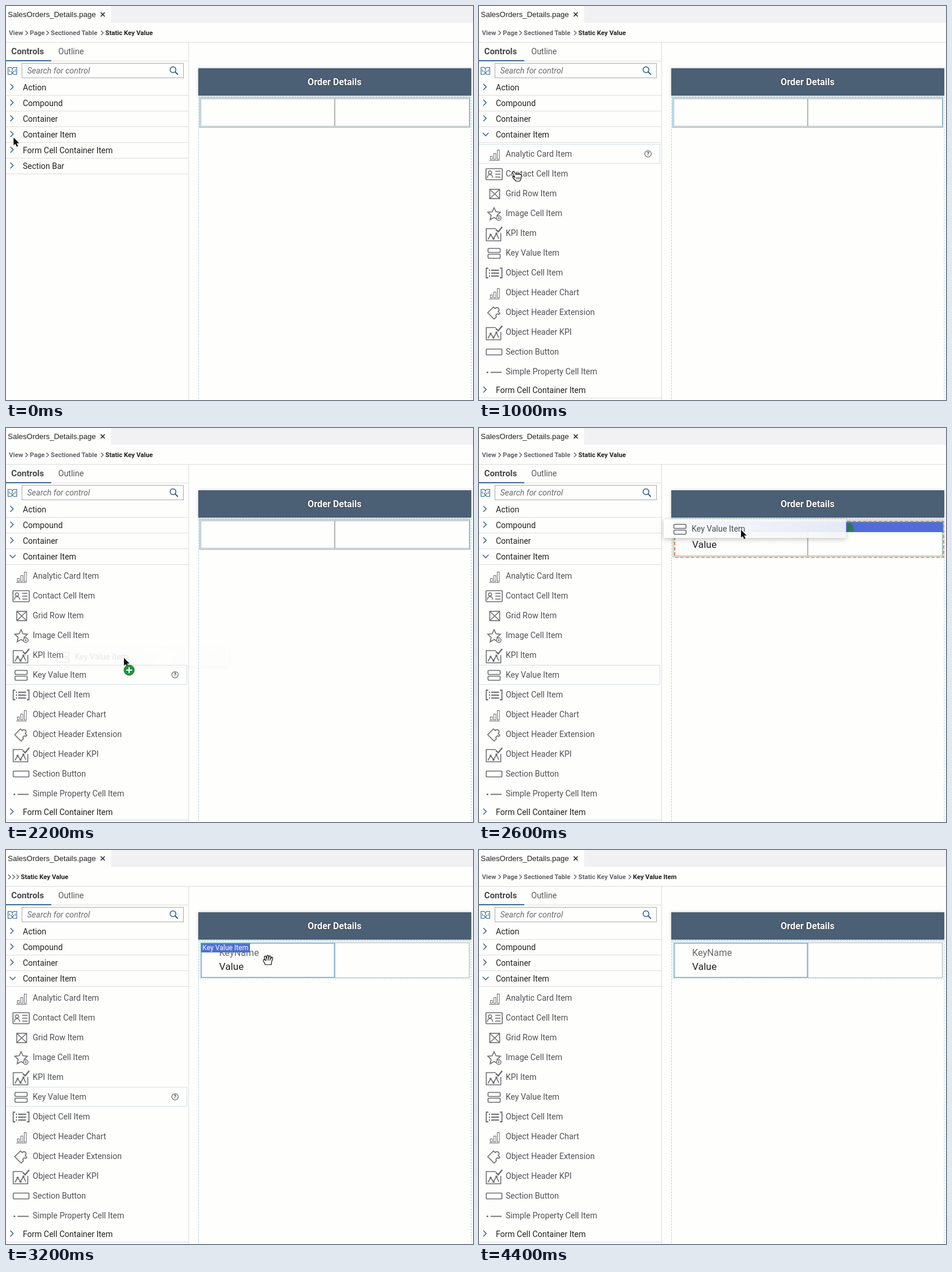
Write an HTML page that moves like this. It is 804 by 677 pixels and loops after 4600 ms.

```html
<!DOCTYPE html>
<html lang="en">
<head>
<meta charset="utf-8">
<style>
  html, body { margin: 0; width: 100%; height: 100%; overflow: hidden; background: #fefefd; }
  svg { display: block; font: 14px Roboto, Arial, sans-serif; fill: none; }
  text { white-space: pre; }
</style>
</head>
<body>
<svg id="stage" width="804" height="677" viewBox="0 0 804 677"></svg>
<script>
const text = (x, y, s, fill = '#222', extra = '') => `<text x="${x}" y="${y}" fill="${fill}" ${extra}>${s}</text>`;
const path = (d, stroke, width = 1, extra = '') => `<path d="${d}" stroke="${stroke}" stroke-width="${width}" ${extra}/>`;
const box = (x, y, w, h, stroke, width = 1, extra = '') =>
  `<rect x="${x}" y="${y}" width="${w}" height="${h}" stroke="${stroke}" stroke-width="${width}" ${extra}/>`;
const fillBox = (x, y, w, h, fill, extra = '') => `<rect x="${x}" y="${y}" width="${w}" height="${h}" fill="${fill}" ${extra}/>`;
const group = (id, body) => `<g id="${id}">${body}</g>`;
const place = (x, y, body) => `<g transform="translate(${x} ${y})">${body}</g>`;

// Icons are drawn around the middle of a list row
const grey = '#6b6d70';
const bars = box(-6.5, 4.5, 3.5, 5, grey) + box(-.5, -.5, 3.5, 10, grey) + box(5.5, -6.5, 3.5, 16, grey) + path('M-8.5 11.5H9.5', grey);
const kpi = path('M3-7.5H-13.5V13.5H11.5V0', grey, 1.6) + path('M-10.5 11L-6 3-1 10 4 1 8 10', grey, 1.6) +
  path('M3-6L7-2 14-10.5', grey, 2.4) +
  [[-6, 3], [-1, 10], [4, 1]].map(([x, y]) => `<circle cx="${x}" cy="${y}" r="1.8" fill="${grey}"/>`).join('');
const star = Array.from({ length: 10 }, (_, i) => {
  const r = i % 2 ? 5.4 : 11.5, a = (i / 5 - .5) * Math.PI;
  return `${(r * Math.cos(a)).toFixed(1)} ${(r * Math.sin(a) + 2).toFixed(1)}`;
}).join('L');
const pair = box(-10.5, -7.5, 21, 7, grey, 1.6, 'rx="1.5"') + box(-10.5, 2.5, 21, 7, grey, 1.6, 'rx="1.5"');
const items = [
  ['Analytic Card Item', bars],
  ['Contact Cell Item', box(-14, -8.5, 28, 19, grey, 1.6, 'rx="1"') +
    `<circle cx="-7" cy="-2" r="2.8" stroke="${grey}" stroke-width="1.4"/>` +
    path('M-11.5 7c0-7 9-7 9 0M2-4H11M2 1H11M2 6H11', grey, 1.6)],
  ['Grid Row Item', box(-7.5, -7, 17, 16, grey, 1.6) + path('M-7.5-7L9.5 9M9.5-7L-7.5 9', grey, 1.5)],
  ['Image Cell Item', path(`M${star}Z`, grey, 1.6) +
    `<circle cx="8" cy="8.5" r="4" fill="#fefefd" stroke="${grey}" stroke-width="1.4"/>` + path('M6 8.5H10M8 6.5V10.5', grey, 1.2)],
  ['KPI Item', kpi],
  ['Key Value Item', pair],
  ['Object Cell Item', path('M-10-7.5H-13.5V9H-10M10-7.5H13.5V9H10M-5-4H8.5M-5 1H8.5M-5 6H8.5', grey, 1.8) +
    path('M-9-4H-7M-9 1H-7M-9 6H-7', grey, 2)],
  ['Object Header Chart', bars],
  ['Object Header Extension', path('M-11 1L-1-9 2-6a3.6 3.6 0 1 1 5 5L10 2 8 4a2.6 2.6 0 1 0-4 4L0 12Z', grey, 1.7, 'stroke-linejoin="round"')],
  ['Object Header KPI', kpi],
  ['Section Button', box(-13.5, -4.5, 27, 10, grey, 1.6, 'rx="1"')],
  ['Simple Property Cell Item', path('M-6 1.5H13', grey, 1.8) + `<circle cx="-11.5" cy="1.5" r="1.6" fill="${grey}"/>`],
];
const rowY = i => 254 + 34 * i;
const row = ([name, icon]) => place(26, 0, icon) + text(46, 5, name, '#4f5154');

const section = (name, y, open) =>
  path(open ? `M6.5 ${y - 3}l5 5 5-5` : `M7.5 ${y - 6}l5 5-5 5`, '#2c5d86', 1.4) +
  text(29, y + 5, name) + path(`M0 ${y + 13.5}H314`, '#dcdddd');

// Breadcrumb: pairs of x and label, the last one darker
const crumb = x => path(`M${x} 42.5l4 3.8-4 3.8`, '#555', 1.2);
const bold = 'font-size="11.2" font-weight="700"';
const crumbs = list => list.map(([x, s], i) =>
  (i ? crumb(x - 7.5) : '') + text(x, 50, s, i === list.length - 1 ? '#222' : '#626467', bold)).join('');
const trail = [[5, 'View'], [41, 'Page'], [77, 'Sectioned Table'], [171, 'Static Key Value']];

const dashed = (x, y, w, h, color, dash = '3 2') => box(x, y, w, h, color, 1, `stroke-dasharray="${dash}"`);
const cells = h => box(335.5, 159.5, 462, h, '#b3b5b6') + path(`M566 159.5v${h}`, '#a3a5a6', 1.6);

const outline = 'fill="#fff" stroke-linejoin="round"';
const palm = path('M-6 8C-6 5-10 2-9 0-8-2-6 0-5 1L-7-4C-8-7-5-8-4-5L-3-2V-6C-3-9 0-9 0-6V-2L1-6C2-8 4-7 4-5L3-1 5-4C6-6 8-4 7-2L5 4V8Z',
  '#111', 1.2, outline) + path('M-3-2V1M0-2V1M3-1L2.500 1', '#111');
const finger = path('M1 1C3-1 4 1 5 3L7 6C7 3 10 4 10 6 11 3 13 4 13 6 15 4 16 6 16 8L15 14 13 17H7L2 12C0 9 2 8 5 11L1 3Z',
  '#111', 1.2, outline) + path('M8 10V14M10.5 10V14M13 10V14', '#111', .9);
const arrow = path('M0 0V13.5L3 10.8 5.4 15.8 7.8 14.7 5.5 9.8H9.8Z', '#fff', 1.2, 'fill="#111" paint-order="stroke"');
const badge = '<circle cx="9" cy="21" r="9" fill="#23933c" stroke="#287a3b"/>' + path('M9 16v10M4 21h10', '#fff', 2.2);

stage.innerHTML = `
<defs>
  <linearGradient id="sheet"><stop stop-color="#fff" stop-opacity=".97"/><stop offset=".3" stop-color="#fbfcfd" stop-opacity=".95"/>
    <stop offset="1" stop-color="#f6f8fb" stop-opacity=".88"/></linearGradient>
  <filter id="soft" x="-10%" y="-60%" width="120%" height="240%"><feDropShadow dx="0" dy="2" stdDeviation="4.5" flood-opacity=".26"/></filter>
  <filter id="halo" x="-5%" y="-20%" width="110%" height="140%"><feDropShadow dx="0" dy="0" stdDeviation="2" flood-opacity=".25"/></filter>
</defs>` +
  fillBox(0, 0, 804, 677, '#fefefd') + fillBox(181, 0, 623, 29, '#f1f1f4') +
  text(3, 19, 'SalesOrders_Details.page', '#222', 'style="font:13px Liberation Sans,Arial,sans-serif"') +
  path('M163 11l7 7m0-7l-7 7', '#222', 1.5) +
  group('crumbsRow', crumbs(trail)) +
  group('crumbsShort', [4, 11, 18].map(crumb).join('') + text(25.5, 50, 'Static Key Value', '#222', bold)) +
  group('crumbsItem', crumbs([...trail, [265, 'Key Value Item']])) +
  path('M0 62.5H804M314.5 62.5V677M0 94.5H314', '#dcdddd') +
  text(9, 83, 'Controls', '#45484b', 'font-size="14.8" font-weight="700"') + text(90, 83, 'Outline', '#55585b') +
  fillBox(0, 93, 78, 2, '#3f6a92') +
  path('M3.5 117.5V105.5h5l2.5 2 2.5-2h5v12h-5l-2.5-2-2.5 2zM11 107v5M6 109v4m10-4v4M8 112l3 3 3-3', '#35668f', 1.1) +
  box(27.5, 98.5, 278, 25, '#a9abad') + text(36.5, 116, 'Search for control', '#6a6c6e', 'font-style="italic"') +
  '<circle cx="287.5" cy="109.5" r="5" stroke="#2c5d86" stroke-width="1.5"/>' + path('M291 113l5 5', '#2c5d86', 1.8) +
  section('Action', 140) + section('Compound', 167) + section('Container', 194) +
  group('closed', section('Container Item', 221) + section('Form Cell Container Item', 248) + section('Section Bar', 275)) +
  group('open', section('Container Item', 221, true) +
    group('hover', box(-1, -16.5, 312.5, 33, '#d3e1e6')) +
    group('help', '<circle cx="291" r="5.5" stroke="#55585b" stroke-width="1.1"/>' +
      text(291, 3.2, '?', '#45484b', 'font-size="9" font-weight="700" text-anchor="middle"')) +
    items.map((it, i) => place(0, rowY(i), row(it))).join('') + section('Form Cell Container Item', 660)) +
  dashed(331.5, 155.5, 469.5, 540, '#a9d0dd') +
  fillBox(331, 107, 470, 47, '#4b5f75', 'filter="url(#halo)"') +
  text(565.7, 136, 'Order Details', '#fff', 'font-size="15.8" font-weight="700" text-anchor="middle" style="text-shadow:0 0 2px #222"') +
  group('empty', box(333.5, 157.5, 465, 51, '#78bdd8', 1.3) + cells(47)) +
  group('filled', cells(60) + dashed(333.5, 157.5, 465.5, 64, '#b5d3dc', '2 2') +
    text(367, 182, 'KeyName', '#66686a', 'font-size="16"') + text(367, 206, 'Value', '#222', 'font-size="17"')) +
  group('chosen', box(336, 160, 229.5, 59, '#8bb8d6', 2)) +
  group('target', box(333.5, 157.5, 465, 64, '#9bd3c4') +
    box(337.5, 161.5, 461.5, 17, '#3c9a6c', 1, 'fill="#526bdc"') +
    box(337, 160.5, 463, 61.5, '#ee8e5f', 2.2, 'stroke-dasharray="6 3"') +
    text(484, 174, 'Add item to Key Value content', '#fff', 'font-size="11" text-anchor="end"') +
    path('M634 178V165q4-5 8 0l4 8-2 5z', 'none', 0, 'fill="#2d7a58"')) +
  group('label', fillBox(336, 160, 84, 16, '#4c6fd4') + path('M336 176V160.5H420V162', '#2bc46c', 1.6) +
    text(338, 172, 'Key Value Item', '#fff', 'font-size="12"')) +
  group('ghost', fillBox(-2, -16, 314, 32, 'url(#sheet)', 'filter="url(#soft)"') + row(items[5])) +
  group('arrow', arrow) + group('badge', badge) + group('palm', palm) + group('finger', finger);

const part = id => document.getElementById(id);
const show = (id, on) => part(id).setAttribute('display', on ? 'inline' : 'none');
const move = (id, x, y) => part(id).setAttribute('transform', `translate(${x} ${y})`);

// start time, pointer shape, x, y, hovered row, opacity of the dragged copy
const steps = [
  [0, 'arrow', 13, 226, -1, 0],
  [200, 'arrow', 11, 219, -1, 0],
  [600, 'arrow', 18, 223, -1, 0],
  [1000, 'finger', 57, 284, 0, 0],
  [1200, 'palm', 128, 456, 6, 0],
  [1400, 'palm', 156, 556, 9, 0],
  [1600, 'palm', 158, 523, 8, 0],
  [1800, 'palm', 133, 426, 5, 0],
  [2200, 'arrow', 203, 395, 5, .12],
  [2400, 'arrow', 280, 256, 5, .9],
  [2600, 'arrow', 451, 175, 5, 1],
  [2800, 'arrow', 451, 175, 5, 0],
  [3000, 'palm', 452, 189, 5, 0],
  [3800, '', 0, 0, -1, 0],
];

function draw(now) {
  const t = now % 4600;
  const [, pointer, x, y, hovered, drag] = steps.findLast(s => s[0] <= t);
  const between = (a, b) => t >= a && t < b;

  for (const id of ['arrow', 'palm', 'finger']) {
    show(id, id === pointer);
    move(id, x, y);
  }
  show('badge', between(2200, 2600));
  move('badge', x, y);
  show('ghost', drag > 0);
  move('ghost', x - 131, y - 2);
  part('ghost').setAttribute('opacity', drag);

  show('closed', t < 400);
  show('open', t >= 400);
  show('hover', hovered >= 0);
  show('help', hovered >= 0 && !between(2400, 3000));
  move('hover', 0, rowY(hovered));
  move('help', 0, rowY(hovered));

  show('crumbsRow', t < 3200);
  show('crumbsShort', between(3200, 3400));
  show('crumbsItem', t >= 3400);
  show('empty', t < 2600);
  show('filled', t >= 2600);
  show('target', between(2600, 3000));
  show('chosen', t >= 3000);
  show('label', between(3000, 3800));
  requestAnimationFrame(() => draw(performance.now()));
}
draw(performance.now());
</script>
</body>
</html>
```
